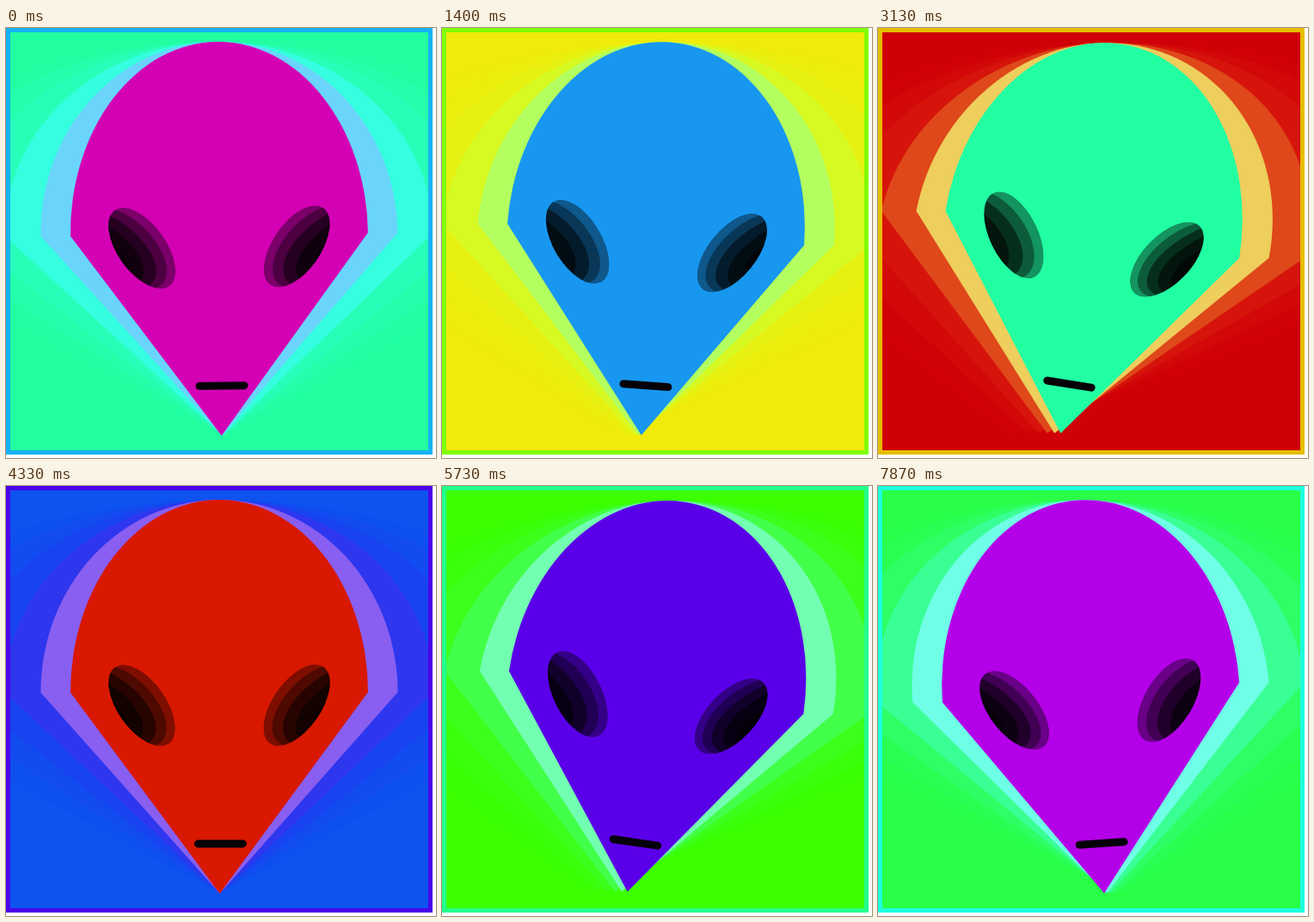
Recreate the animation shown at these times as an HTML page with a canvas. Size 500x500 px, loop 7930 ms.

```html
<!DOCTYPE html>
<html lang="en">
<head>
<meta charset="utf-8">
<title>Alien head</title>
<style>
  html, body { margin: 0; width: 100%; height: 100%; overflow: hidden; background: #fff; }
  canvas { display: block; width: 500px; height: 500px; }
</style>
</head>
<body>
<canvas id="stage" width="500" height="500"></canvas>
<script>
const ctx = document.getElementById('stage').getContext('2d');
const LOOP = 7930, STEP = 200 / 3, SIZE = 496, MID = SIZE / 2, RAD = Math.PI / 180;

// Rainbow stops: phase in degrees, then r, g, b
const RAINBOW = [
  [-2, 208, 0, 8], [11, 216, 24, 0], [41, 230, 190, 0], [46, 240, 235, 10],
  [71, 200, 255, 10], [106, 60, 255, 0], [130, 40, 255, 70], [154, 34, 255, 160],
  [172, 30, 255, 220], [189, 22, 215, 255], [203, 24, 151, 240], [214, 14, 82, 240],
  [238, 25, 15, 235], [263, 90, 0, 232], [274, 140, 0, 232], [287, 180, 0, 232],
  [311, 212, 0, 180], [335, 212, 0, 90], [358, 208, 0, 8]
];

// Echoes of the head: power of the stretch, phase offset, share of white
const ECHOES = [[5, 1, 0], [4, 3, 0.01], [3, 7, 0.03], [2, 18, 0.1], [1, 41, 0.36]];
const EYE_SHADES = [0.42, 0.38, 0.5, 0.55, 0.6];

function rainbow(phase, white = 0) {
  const p = ((phase + 2) % 360 + 360) % 360 - 2;
  const i = RAINBOW.findIndex(stop => stop[0] > p);
  const a = RAINBOW[i - 1], b = RAINBOW[i];
  const k = (p - a[0]) / (b[0] - a[0]);
  const rgb = [1, 2, 3].map(c => {
    const v = a[c] + (b[c] - a[c]) * k;
    return Math.round(v + (255 - v) * white);
  });
  return `rgb(${rgb})`;
}

// Stretch sideways around the middle, then tilt
function pose(power, tilt) {
  const s = 1.2 ** power;
  ctx.setTransform(s, 0, 0, 1, MID, MID);
  ctx.rotate(tilt);
}

function headPath() {
  ctx.beginPath();
  ctx.ellipse(0, -8, 173, 224, 0, Math.PI, 2 * Math.PI);
  ctx.lineTo(0, 226);
  ctx.closePath();
}

function eyePath(side) {
  ctx.beginPath();
  ctx.ellipse(side * 90, 7, 28, 54.4, side * 35 * RAD, 0, 2 * Math.PI);
}

function drawEye(side, tilt) {
  ctx.save();
  pose(0, tilt);
  eyePath(side);
  ctx.clip();
  EYE_SHADES.forEach((alpha, power) => {
    pose(power, tilt);
    eyePath(side);
    ctx.fillStyle = `rgba(0,0,0,${alpha})`;
    ctx.fill();
  });
  ctx.restore();
}

function sway(step) {
  const u = step * 9 * RAD;
  return (2.15 - 2.83 * Math.cos(u) + 7.98 * Math.sin(u) + 1.37 * Math.sin(2 * u)) * RAD;
}

function draw(step) {
  const hue = 311 + 12 * step, back = hue + 203, tilt = sway(step);

  ctx.setTransform(1, 0, 0, 1, 0, 0);
  ctx.clearRect(0, 0, 500, 500);
  ctx.save();
  ctx.beginPath();
  ctx.rect(0, 0, SIZE, SIZE);
  ctx.clip();
  ctx.fillStyle = rainbow(back);
  ctx.fillRect(0, 0, SIZE, SIZE);

  for (const [power, offset, white] of ECHOES) {
    pose(power, tilt);
    headPath();
    ctx.fillStyle = rainbow(back + offset, white);
    ctx.fill();
  }

  pose(0, tilt);
  headPath();
  ctx.fillStyle = rainbow(hue);
  ctx.fill();
  drawEye(-1, tilt);
  drawEye(1, tilt);

  pose(0, tilt);
  ctx.beginPath();
  ctx.moveTo(-25, 168);
  ctx.lineTo(27, 168);
  ctx.lineWidth = 9;
  ctx.lineCap = 'round';
  ctx.strokeStyle = '#050008';
  ctx.stroke();

  ctx.setTransform(1, 0, 0, 1, 0, 0);
  ctx.lineWidth = 5;
  ctx.strokeStyle = rainbow(back + 43);
  ctx.strokeRect(2.5, 2.5, SIZE - 5, SIZE - 5);
  ctx.restore();
}

const start = performance.now();
function tick() {
  const t = (performance.now() - start) % LOOP;
  // Steps begin on whole hundredths of a second
  draw(Math.floor((Math.floor(t / 10) * 10 + 3.4) / STEP));
  requestAnimationFrame(tick);
}
tick();
</script>
</body>
</html>
```
